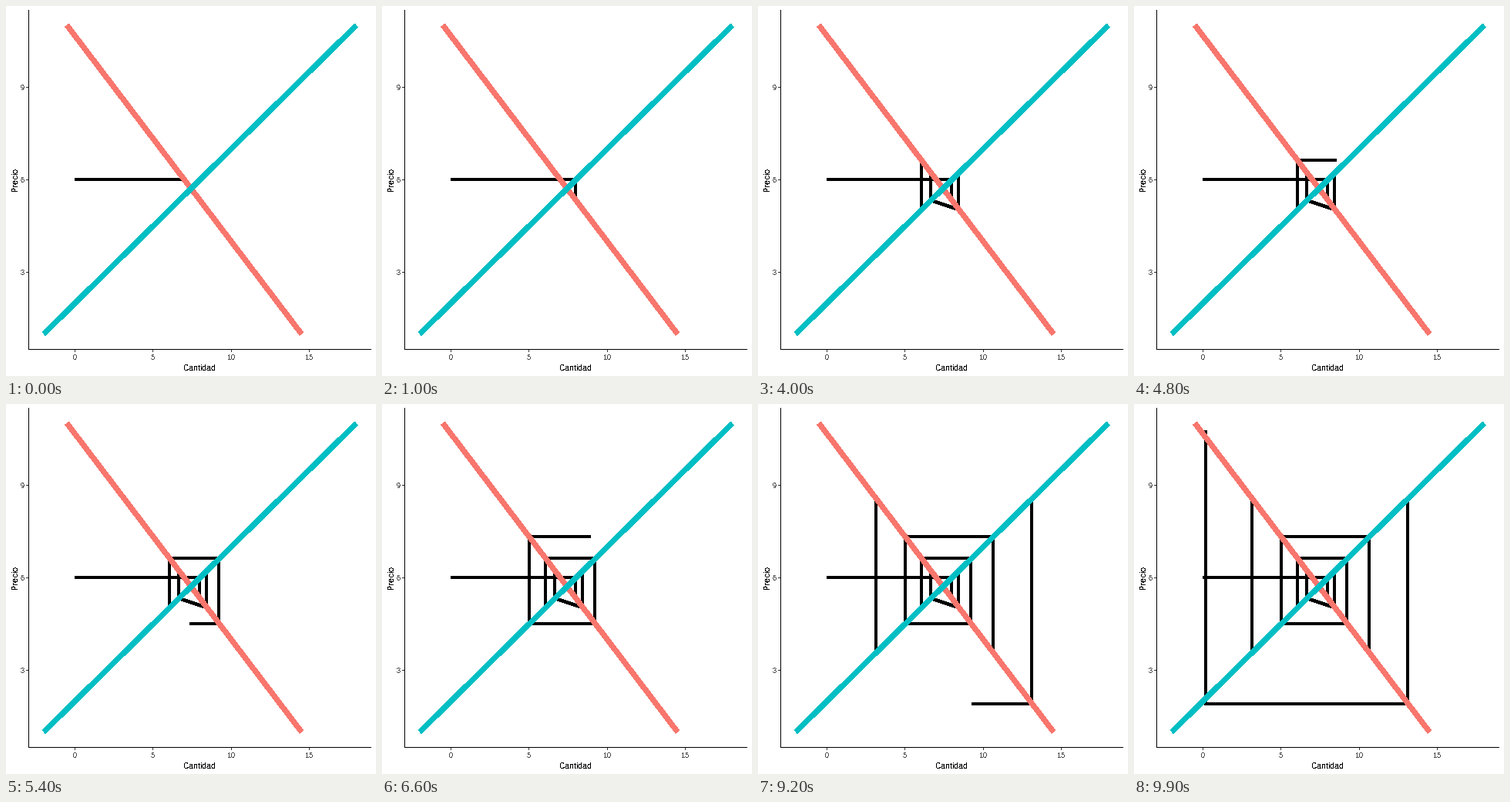
These frames come from a looping animation (480x480 px, 10 s). A matplotlib script:

```python
import math

import matplotlib.pyplot as plt
from matplotlib.animation import FuncAnimation

SIZE, DPI = 480, 72
FRAMES, STEP_MS = 100, 100
LEFT, RIGHT, TOP, BOTTOM = 29.0, 474.45, 5.5, 445.9
RED, TEAL = "#F8766D", "#00BFC4"

plt.rcParams.update({
    "font.family": "Liberation Sans",
    "text.antialiased": False,
    "text.hinting": "native",
    "text.hinting_factor": 1,
})


def px(q):
    return math.floor(LEFT + (q + 3) / 22 * (RIGHT - LEFT))


def py(p):
    return math.floor(BOTTOM - (p - 0.5) / 11 * (BOTTOM - TOP))


def demand_price(q):
    return (16 - q) / 1.5


def supply(p):
    return 2 * p - 4


fig = plt.figure(figsize=(SIZE / DPI, SIZE / DPI), dpi=DPI, facecolor="white")
ax = fig.add_axes([0, 0, 1, 1])
ax.set_xlim(0, SIZE)
ax.set_ylim(SIZE, 0)
ax.axis("off")


def line(xs, ys, color, width, z):
    (artist,) = ax.plot(xs, ys, color=color, lw=width, zorder=z,
                        antialiased=False, snap=False,
                        solid_capstyle="butt", solid_joinstyle="round")
    return artist


def curve(start, end, color, z):
    # quarter-pixel shift centres the hard-edged diagonal on the pixel grid
    qs, ps = zip(start, end)
    line([px(q) + 0.25 for q in qs], [py(p) + 0.25 for p in ps], color, 6, z)


def draw_axes():
    x0, y0 = px(-3), py(0.5)
    line([x0 + 0.5] * 2, [5, y0 + 1], "black", 1, 5)
    line([x0, 474], [y0 + 0.5] * 2, "black", 1, 5)
    for q in (0, 5, 10, 15):
        x = px(q)
        line([x + 0.5] * 2, [y0 + 1, y0 + 4], "#333333", 1, 4)
        ax.text(x, 459, str(q), size=9, color="#4D4D4D",
                ha="center", va="baseline")
    for p in (3, 6, 9):
        y = py(p)
        line([x0 - 3, x0], [y + 0.5] * 2, "#333333", 1, 4)
        ax.text(24, y + 4, str(p), size=9, color="#4D4D4D",
                ha="right", va="baseline")
    ax.text(251.5, 473, "Cantidad", size=11, ha="center", va="baseline")
    ax.text(15, 225, "Precio", size=11, rotation=90,
            rotation_mode="anchor", ha="center", va="baseline")


def cobweb(steps):
    """Vertical moves: pairs of (frame, quantity, price) at each key time."""
    moves, p = [], 6.0
    for k in range(1, steps + 1):
        q = supply(p)
        new_p = demand_price(q)
        key = round(9.9 * k)
        moves.append([(key, abs(q), p), (key, abs(q), new_p)])
        p = new_p
    return moves


v = cobweb(10)
chains = [
    [(0, 0, 6), (0, 7, 6)] + v[0],
    v[1][::-1] + v[2][::-1],
    v[3] + v[4] + v[5] + v[6],
    v[7],
    v[8] + v[9],
]


def revealed(chain, frame):
    pts = [(q, p) for key, q, p in chain if key <= frame]
    if pts and len(pts) < len(chain):
        k0, q0, p0 = chain[len(pts) - 1]
        k1, q1, p1 = chain[len(pts)]
        t = (frame - k0) / (k1 - k0)
        pts.append((q0 + (q1 - q0) * t, p0 + (p1 - p0) * t))
    return [px(q) for q, _ in pts], [py(p) for _, p in pts]


draw_axes()
paths = [line([], [], "black", 3.6, 1) for _ in chains]
curve((-0.5, 11), (14.5, 1), RED, 2)
curve((-2, 1), (18, 11), TEAL, 3)


def update(frame):
    for path, chain in zip(paths, chains):
        path.set_data(*revealed(chain, frame))
    return paths


anim = FuncAnimation(fig, update, frames=FRAMES, interval=STEP_MS,
                     init_func=lambda: update(0), repeat=True, repeat_delay=0)
plt.show()
```
